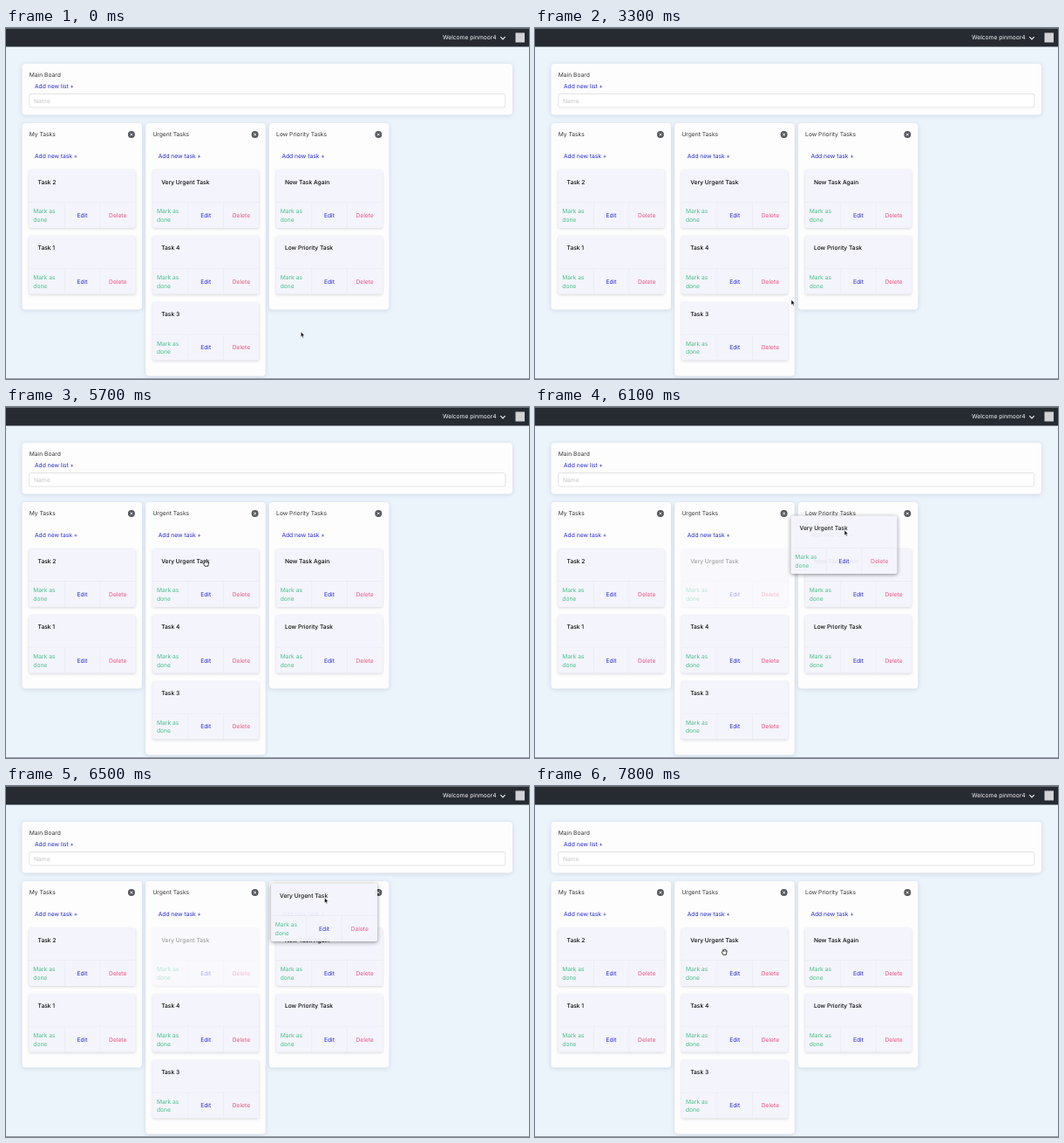
An HTML page for the animation above (8 s loop, 600 by 402 pixels).

```html
<!DOCTYPE html>
<html lang="en">
<head>
<meta charset="utf-8">
<title>Task board</title>
<style>
  html, body { margin: 0; width: 100%; height: 100%; overflow: hidden; background: #ebf3fb; }
  svg { display: block; width: 100%; height: 100%; }
  text { font: 6.7px Inter, "Open Sans", sans-serif; fill: #363636; text-rendering: geometricPrecision; }
  .panel { fill: #fdfdfe; filter: drop-shadow(0 1.5px 2.5px rgba(30, 50, 80, .14)); }
  .card { fill: #f4f4fc; filter: drop-shadow(0 1.5px 1.8px rgba(20, 20, 50, .16)); }
  .rule { fill: none; stroke: #e7e7f2; stroke-width: .6; }
  .title { font-weight: 500; fill: #0a0a0a; }
  .link { fill: #2427d8; }
  .done { fill: #48c08a; }
  .delete { fill: #ee5680; }
  .mid { text-anchor: middle; }
  #ghost { filter: drop-shadow(0 1px 2.5px rgba(0, 0, 0, .35)); opacity: .94; }
</style>
</head>
<body>
<svg id="stage" viewBox="0 0 600 402"></svg>
<script>
const LOOP = 8000, STEP = 100;
const HOME = { x: 168.2, y: 162.5 };
const GRAB = { x: 61.5, y: 16.5 };
const DRAG_START = 5750, DROP = 6950, LANDED = 7500;

const columns = [
  { x: 18.5, name: 'My Tasks', tasks: ['Task 2', 'Task 1'] },
  { x: 160.2, name: 'Urgent Tasks', tasks: ['Very Urgent Task', 'Task 4', 'Task 3'] },
  { x: 301.9, name: 'Low Priority Tasks', tasks: ['New Task Again', 'Low Priority Task'] }
];

const label = (x, y, string, type = '') => `<text x="${x}" y="${y}" class="${type}">${string}</text>`;
const box = (x, y, w, h, r, attrs) => `<rect x="${x}" y="${y}" width="${w}" height="${h}" rx="${r}" ${attrs}/>`;

const card = (x, y, title, id = '') => `
  <g ${id && `id="${id}"`} transform="translate(${x} ${y})">
    ${box(0, 0, 122, 66.5, 2, 'class="card"')}
    <path class="rule" d="M0 37H122M40.7 37V66.5M81.3 37V66.5"/>
    ${label(10, 16.2, title, 'title')}
    ${label(4.8, 49.6, 'Mark as', 'done')}
    ${label(4.8, 59.3, 'done', 'done')}
    ${label(61, 54.3, 'Edit', 'link mid')}
    ${label(101.7, 54.3, 'Delete', 'delete mid')}
  </g>`;

const column = ({ x, name, tasks }, i) => `
  ${box(x, 109, 137.5, 62 + tasks.length * 75.8, 4, `class="panel" id="column${i}"`)}
  ${label(x + 8.2, 124.3, name)}
  <circle cx="${x + 125.4}" cy="122" r="4" fill="#56595e"/>
  <path d="M${x + 124} 120.6l2.8 2.8m0-2.8l-2.8 2.8" stroke="#fff" stroke-width=".9"/>
  ${label(x + 14.5, 148.6, 'Add new task +', 'link')}
  ${tasks.map((task, n) => card(x + 8, HOME.y + n * 75.8, task, i === 1 && n === 0 ? 'dragged' : '')).join('')}`;

document.getElementById('stage').innerHTML = `
  ${box(0, 0, 600, 402, 0, 'fill="#ebf3fb"')}
  ${box(0, 0, 600, 21.5, 0, 'fill="#262b32"')}
  ${box(0, 0, 600, .7, 0, 'fill="#8b8e92"')}
  <text x="501" y="13.4" style="fill:#f5f5f5">Welcome pinmoor4</text>
  <path d="M567.3 10.2l2.7 2.8 2.7-2.8" fill="none" stroke="#f5f5f5" stroke-width="1.1"/>
  ${box(584.5, 5.5, 10.5, 11, 0, 'fill="#d2d3d4"')}
  ${box(18.5, 41, 562.5, 58.5, 4, 'class="panel"')}
  ${label(26.8, 56.2, 'Main Board')}
  ${label(33, 69.2, 'Add new list +', 'link')}
  ${box(26.8, 75.5, 546, 15.5, 2, 'fill="#fff" stroke="#d8d9dc" stroke-width=".7"')}
  <text x="32" y="85.6" style="fill:#c3c4c7">Name</text>
  ${columns.map(column).join('')}
  ${box(0, 401.2, 600, .8, 0, 'fill="#85898e"')}
  ${card(0, 0, 'Very Urgent Task', 'ghost')}
  <path id="arrow" d="M0 0V5.9L1.4 4.7 2.3 6.8 3.3 6.4 2.4 4.3H4.2Z" fill="#000" stroke="#fff" stroke-width=".5"/>
  <path id="hand" d="M-1.6 3.3L-2.8 1Q-3.2-.4-2-.3V-1.9Q-1.6-3-.8-2.3 0-3.4.8-2.4 1.7-3 2-1.9 3-1.8 2.8-.5L2.1 3.3ZM-.8-1.8V-.4M.7-1.8V-.4M2-1.5V-.3"
    fill="#fff" stroke="#111" stroke-width=".8" stroke-linejoin="round"/>`;

// Pointer path: time, x, y
const path = [
  [0, 338.3, 348], [3200, 338.3, 348], [3300, 294, 311.3], [3400, 246, 238], [3500, 221, 193.5],
  [3600, 221, 193.5], [3900, 221, 183.5], [4600, 221, 183.5], [5000, 227, 157.5],
  [5400, 229.7, 179], [5700, 229.7, 179], [5800, 248, 174], [6100, 355, 141], [6400, 365, 129],
  [6500, 365.5, 128], [6700, 364, 135.5], [7400, 364, 135.5], [7800, 217.3, 190], [LOOP, 217.3, 190]
];

function pointerAt(t) {
  const next = path.findIndex(([time], i) => i > 0 && t <= time);
  const [t0, x0, y0] = path[next - 1], [t1, x1, y1] = path[next];
  const p = (t - t0) / (t1 - t0);
  return { x: x0 + (x1 - x0) * p, y: y0 + (y1 - y0) * p };
}

const [arrow, hand, ghost, dragged, target] =
  ['arrow', 'hand', 'ghost', 'dragged', 'column2'].map(id => document.getElementById(id));
const show = (el, visible) => el.setAttribute('visibility', visible ? 'visible' : 'hidden');
const place = (el, { x, y }) => el.setAttribute('transform', `translate(${x} ${y})`);

function render(t) {
  const pointer = pointerAt(t);
  const dragging = t >= DRAG_START && t < DROP;
  const airborne = t >= DRAG_START && t < LANDED;
  const useArrow = t < 3400 || dragging;

  // After the drop the lifted card glides back to its slot.
  const glide = t < DROP ? 0 : 1 - Math.pow(1 - Math.min(1, (t - DROP) / (LANDED - DROP)), 2.6);
  const held = { x: pointer.x - GRAB.x, y: pointer.y - GRAB.y };
  place(ghost, { x: held.x + (HOME.x - held.x) * glide, y: held.y + (HOME.y - held.y) * glide });
  show(ghost, airborne);
  dragged.setAttribute('opacity', airborne ? .38 : 1);
  target.setAttribute('height', t >= 6200 && t < 6500 ? 240 : 213.6);

  place(arrow, pointer);
  place(hand, pointer);
  show(arrow, useArrow);
  show(hand, !useArrow);
}

const start = performance.now();
function tick() {
  const t = (performance.now() - start) % LOOP;
  render(Math.floor(t / STEP) * STEP);
  requestAnimationFrame(tick);
}
tick();
</script>
</body>
</html>
```
